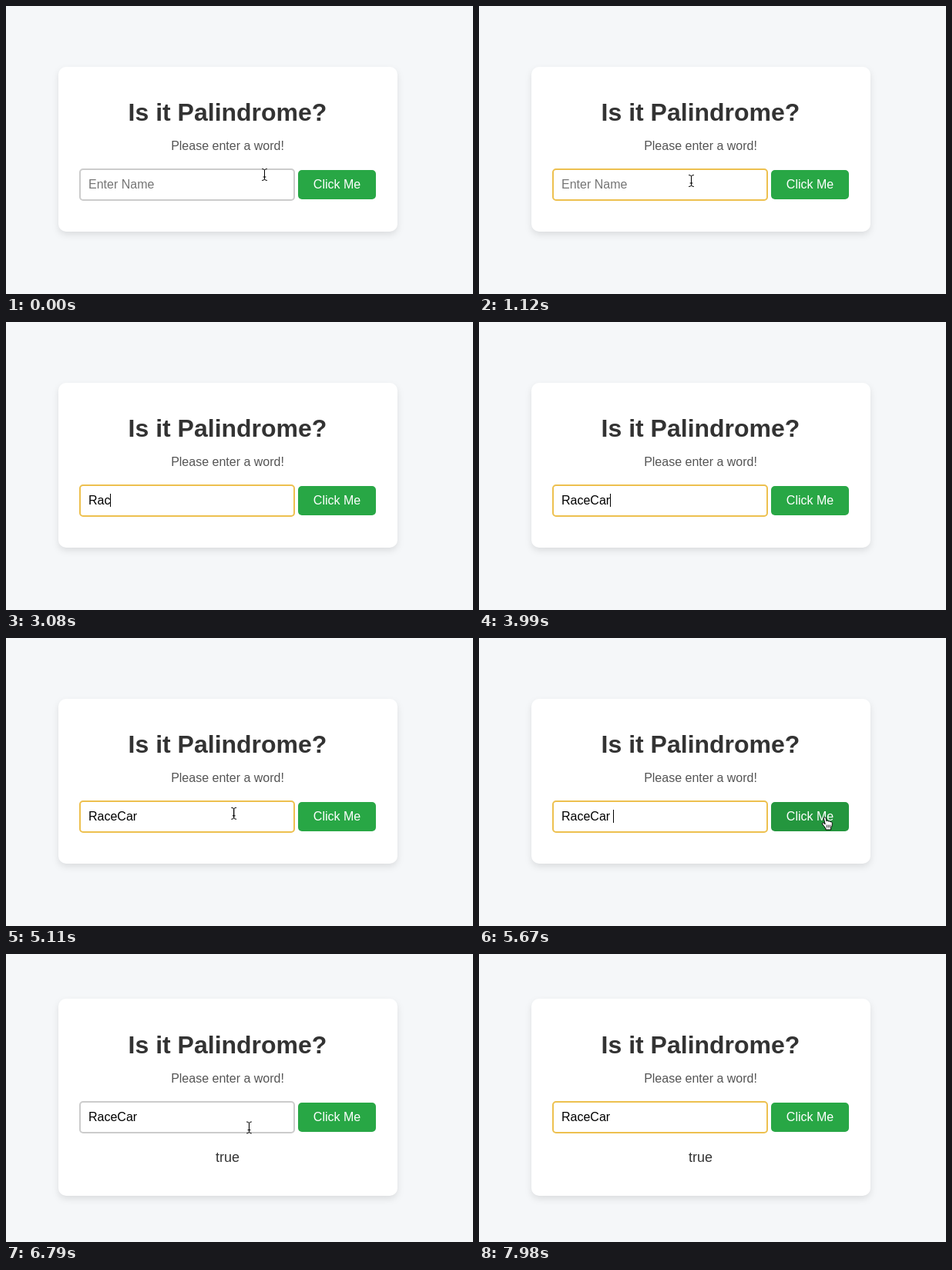
Recreate the animation shown at these times as an HTML page. Size 606 px wide and 374 px high, loop 8 s.

```html
<!DOCTYPE html>
<html lang="en">
<head>
<meta charset="utf-8">
<title>Palindrome check</title>
<style>
  html, body { margin: 0; width: 100%; height: 100%; overflow: hidden; background: #f5f7f9; }
  svg { display: block; width: 606px; height: 374px; font: 16px "Liberation Sans", Arial, sans-serif; }
  .mid { text-anchor: middle; }
  #card { filter: drop-shadow(0 4px 4px rgba(0, 0, 0, .1)); }
  #value { white-space: pre; }
</style>
</head>
<body>
<svg viewBox="0 0 606 374">
  <rect id="card" x="68" y="79" width="440" height="214" rx="10" fill="#fff"/>
  <g id="form">
    <text class="mid" x="287.5" y="149" font-size="32" font-weight="bold" fill="#333">Is it Palindrome?</text>
    <text class="mid" x="287.5" y="187" fill="#555">Please enter a word!</text>
    <rect id="field" x="96" y="212" width="278" height="40" rx="4" fill="#fff" stroke-width="2"/>
    <text id="hint" x="107" y="237" fill="#757575">Enter Name</text>
    <text id="value" x="107" y="237"></text>
    <rect id="caret" y="223" width="1" height="17"/>
    <rect id="button" x="379" y="213" width="101" height="38" rx="5"/>
    <text class="mid" x="429.5" y="237" fill="#fff">Click Me</text>
    <text id="result" class="mid" x="287.5" y="290" font-size="18" fill="#333">true</text>
  </g>
  <g id="pointer">
    <g id="beam" fill="none" stroke-linecap="round">
      <path d="M-3 -7.5Q0 -7.5 0 -5.5V5.5Q0 7.5 -3 7.5M3 -7.5Q0 -7.5 0 -5.5V5.5Q0 7.5 3 7.5M-1.5 3H1.5" stroke="#fff" stroke-width="2" stroke-opacity=".7"/>
      <path d="M-3 -7.5Q0 -7.5 0 -5.5V5.5Q0 7.5 -3 7.5M3 -7.5Q0 -7.5 0 -5.5V5.5Q0 7.5 3 7.5M-1.5 3H1.5" stroke="#000"/>
    </g>
    <path id="arrow" d="M0 0V15.5L3.6 12.2L5.9 17.4L8.3 16.4L6.1 11.3H11Z" stroke="#fff"/>
    <g id="hand" stroke="#000" stroke-linejoin="round" stroke-linecap="round">
      <path d="M-1.6 1.3C-1.8 -.5 .7 -.8 1.1 .9L2.1 5C2.3 3.8 4.3 3.8 4.6 5.3C5.2 4.3 6.9 4.6 7.1 6C7.9 5.3 9.3 5.9 9.3 7.3C9.4 10.3 8.9 11.4 7.7 13.4V16H.9V14.3C-.6 12.5 -1.6 10.7 -3.2 9C-4.4 7.5 -2.6 6.3 -1.4 7.4L-.1 8.6Z" fill="#fff"/>
      <path d="M2.5 10V13M4.6 10V13M6.6 10V13" fill="none" stroke-width=".8"/>
    </g>
  </g>
</svg>
<script>
const LOOP = 8000;
const ui = {};
document.querySelectorAll('[id]').forEach(el => ui[el.id] = el);

// time, value: each value holds until the next time
const typing = [[0, ''], [2450, 'R'], [2660, 'Ra'], [2940, 'Rac'], [3220, 'Race'],
  [3640, 'RaceC'], [3780, 'RaceCa'], [3990, 'RaceCar'], [4200, 'RaceCar ']];
const focus = [[0, 0], [980, 1], [5740, 0], [6990, 1]];
const blink = [[0, 0], [1540, 1], [2030, 0], [2450, 1], [4760, 0], [5250, 1],
  [5740, 0], [7070, 1], [7560, 0]];
const shape = [[0, 'beam'], [2450, ''], [4970, 'beam'], [5460, 'arrow'], [5500, 'hand'],
  [5990, 'arrow'], [6720, 'beam'], [7980, '']];

// time, x, y of the pointer
const path = [[0, 335.5, 219], [70, 335.5, 219], [560, 275.5, 227], [4970, 275.5, 227],
  [5460, 376, 231], [5670, 449, 233], [5810, 449, 233], [6020, 433.5, 230.5],
  [6580, 424, 235], [7000, 208.5, 216]];

const held = (table, t) => table.filter(row => row[0] <= t).pop()[1];
const clamp = v => Math.min(1, Math.max(0, v));
const ease = v => v * v * (3 - 2 * v);
const show = (el, on) => el.setAttribute('visibility', on ? 'visible' : 'hidden');

function pointerAt(t) {
  const i = path.findIndex(p => p[0] > t);
  if (i < 0) return path[path.length - 1].slice(1);
  const a = path[i - 1], b = path[i];
  const k = ease((t - a[0]) / (b[0] - a[0]));
  return [a[1] + (b[1] - a[1]) * k, a[2] + (b[2] - a[2]) * k];
}

function buttonColor(t) {
  const hover = ease(clamp((t - 5510) / 300)) - ease(clamp((t - 5990) / 300));
  const mix = (a, b) => Math.round(a + (b - a) * hover);
  return `rgb(${mix(40, 33)},${mix(167, 136)},${mix(69, 56)})`;
}

function draw(t) {
  const done = t >= 5810;
  ui.card.setAttribute('y', done ? 58 : 79);
  ui.card.setAttribute('height', done ? 256 : 214);
  ui.form.setAttribute('transform', `translate(0 ${done ? -20 : 0})`);
  show(ui.result, done);

  const text = held(typing, t);
  if (ui.value.textContent !== text) ui.value.textContent = text;
  show(ui.hint, !text);
  ui.field.setAttribute('stroke', held(focus, t) ? '#edc04f' : '#ccc');
  ui.caret.setAttribute('x', Math.floor(107 + (text ? ui.value.getComputedTextLength() : 0)));
  show(ui.caret, held(blink, t));
  ui.button.setAttribute('fill', buttonColor(t));

  const kind = held(shape, t);
  for (const name of ['beam', 'arrow', 'hand']) show(ui[name], name === kind);
  ui.pointer.setAttribute('transform', `translate(${pointerAt(t).join(' ')})`);
}

const start = performance.now();
function tick() {
  draw((performance.now() - start) % LOOP);
  requestAnimationFrame(tick);
}
tick();
</script>
</body>
</html>
```
